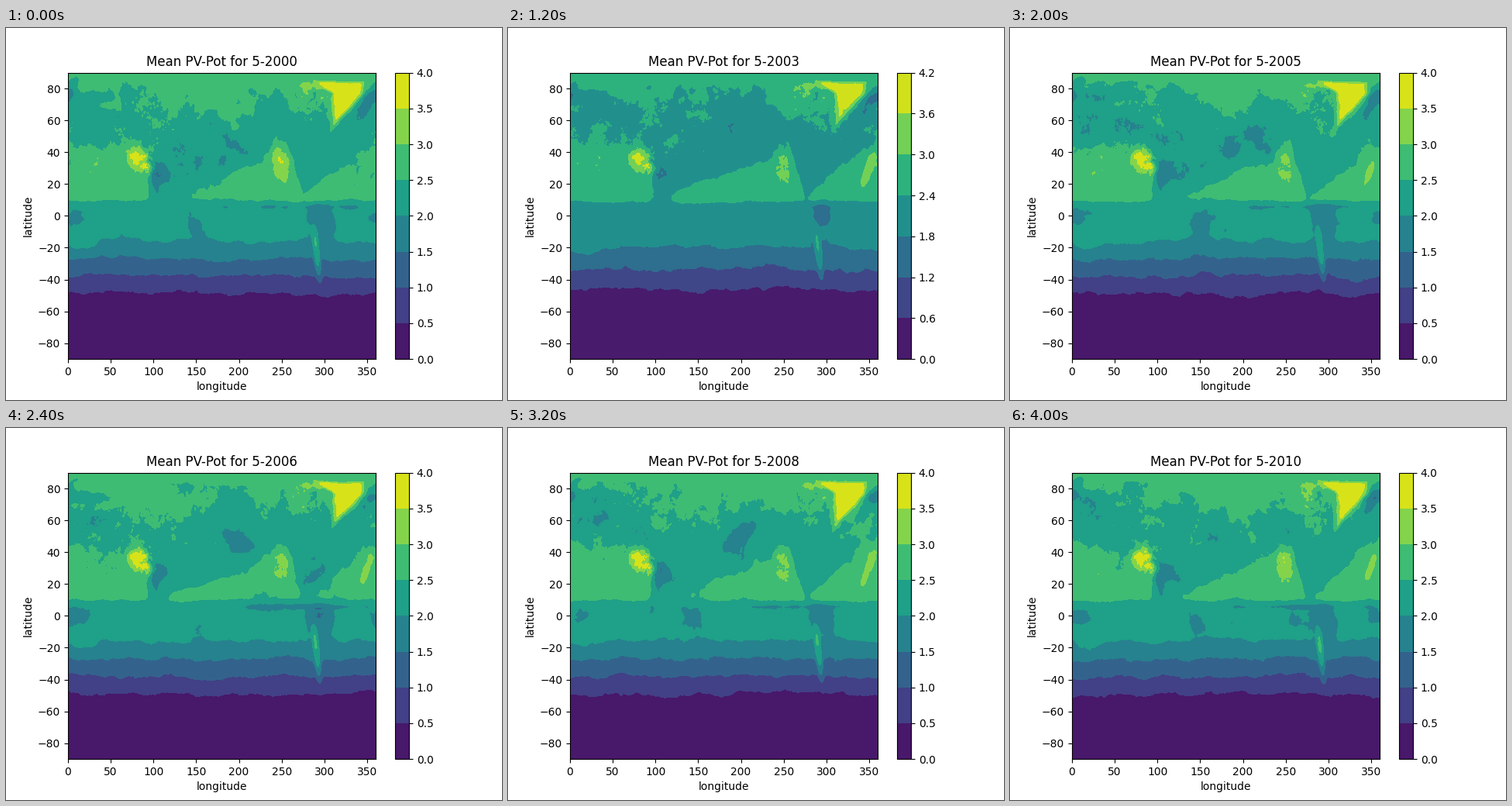
Recreate the animation shown at these times as a matplotlib script. Size 640 by 480 pixels, loop 4.4 s.

```python
import numpy as np
import matplotlib.pyplot as plt
from matplotlib.animation import FuncAnimation

YEARS = range(2000, 2011)
LON, LAT = np.meshgrid(np.linspace(0, 359.75, 480), np.linspace(-90, 90, 241))


def ramp(x):
    return 1 / (1 + np.exp(-np.clip(x, -50, 50)))


def bump(lon, lat, length, width, tilt=0):
    """Flat-topped ellipse with half height at its half axes."""
    dx = (LON - lon + 180) % 360 - 180
    dy = LAT - lat
    c, s = np.cos(np.radians(tilt)), np.sin(np.radians(tilt))
    r = np.hypot((dx * c + dy * s) / length, (dy * c - dx * s) / width)
    return np.exp(-.69 * r ** 3)


def fractal(seed, power):
    rows, cols = LON.shape
    noise = np.random.default_rng(seed).normal(size=LON.shape)
    kx = np.fft.fftfreq(cols, 1 / cols)
    ky = np.fft.fftfreq(rows, 1 / rows)[:, None]
    k = np.sqrt(9 + .6 * kx ** 2 + ky ** 2)
    smooth = np.fft.ifft2(np.fft.fft2(noise) * k ** -power).real
    return smooth / smooth.std()


def dry_belt():
    # Its northern edge climbs eastwards across both oceans
    edge = np.interp(LON, [0, 85, 105, 125, 225, 255, 275, 290, 345, 360],
                     [43, 43, 8, 14, 35, 45, 12, 18, 43, 43])
    return ramp((LAT - 9) / 1.2) * ramp((edge - LAT) / 2.5)


def ice_sheet():
    # Wedge with its tip in the south and a flat northern edge
    right = np.minimum(317 + 1.7 * (LAT - 61), 344)
    left = 311 - 2.5 * np.maximum(LAT - 77, 0)
    inside = np.minimum(np.minimum(LON - left, right - LON), 3 * (83.5 - LAT))
    return ramp(inside / 2)


def climate():
    zonal = np.minimum(.5 + .0445 * (LAT + 49), 2.13)
    zonal += .14 * ramp((LAT - 38) / 4) + .37 * ramp((LAT - 69) / 4)
    plateau = bump(87, 34, 14, 6.5, -15)
    rockies = bump(248, 34, 13, 8, -75)
    arctic_isles = bump(283, 71, 26, 13)
    desert = bump(348, 28, 12, 4, 55)
    highs = (.55 * dry_belt() + 1.4 * ice_sheet() + .65 * plateau + .45 * rockies
             + .18 * arctic_isles + .38 * desert + .35 * bump(292, 82, 20, 2)
             + .75 * bump(291, -24, 15, 3, -78) + .2 * bump(18, -18, 16, 7))
    lows = (.4 * bump(18, 75, 34, 4) + .5 * bump(352, 72, 20, 5, 35)
            + .3 * bump(100, 19, 13, 6, 75) + .45 * bump(108, 28, 9, 5)
            + .4 * bump(293, 1, 12, 6) + .25 * bump(297, -7, 14, 11)
            + .2 * bump(270, 6, 70, 2) + .22 * bump(10, 0, 17, 6)
            + .2 * bump(150, -8, 16, 9, -30))
    rugged = (.3 * plateau + .15 * rockies + .2 * arctic_isles
              + .1 * bump(80, 55, 90, 25) + .1 * bump(30, 29, 18, 8))
    return zonal + highs - lows + rugged * fractal(7, 1.1)


def cloud_patches(year):
    rng = np.random.default_rng(year)
    ocean = bump(rng.uniform(170, 200), rng.uniform(38, 55), 24, 6, rng.uniform(-30, 30))
    land = bump(rng.uniform(15, 65), rng.uniform(55, 68), 20, 5, rng.uniform(-15, 15))
    return .38 * ocean + .28 * land


CLIMATE = climate()
ROUGHNESS = (.055 + .09 * ramp((LAT - 30) / 8)) * ramp((84 - LAT) / 1.5)


def field(year):
    weather = .8 * fractal(year, 1.9) + .4 * fractal(year + 50, 1.4)
    return CLIMATE - cloud_patches(year) + ROUGHNESS * weather


def draw(i):
    year = YEARS[i]
    step, top = (.6, 4.2) if year == 2003 else (.5, 4.0)
    levels = np.arange(round(top / step) + 1) * step
    data = np.clip(field(year), .01, top - .01)
    fig.clear()
    ax = fig.add_subplot()
    filled = ax.contourf(LON, LAT, data, levels=levels, cmap="viridis")
    fig.colorbar(filled, ax=ax, ticks=levels, format="%.1f")
    ax.set(title=f"Mean PV-Pot for 5-{year}", xlabel="longitude", ylabel="latitude")
    return []


fig = plt.figure(figsize=(6.4, 4.8), dpi=100)
anim = FuncAnimation(fig, draw, frames=len(YEARS), init_func=lambda: [],
                     interval=400, repeat=True, repeat_delay=0)
plt.show()
```
